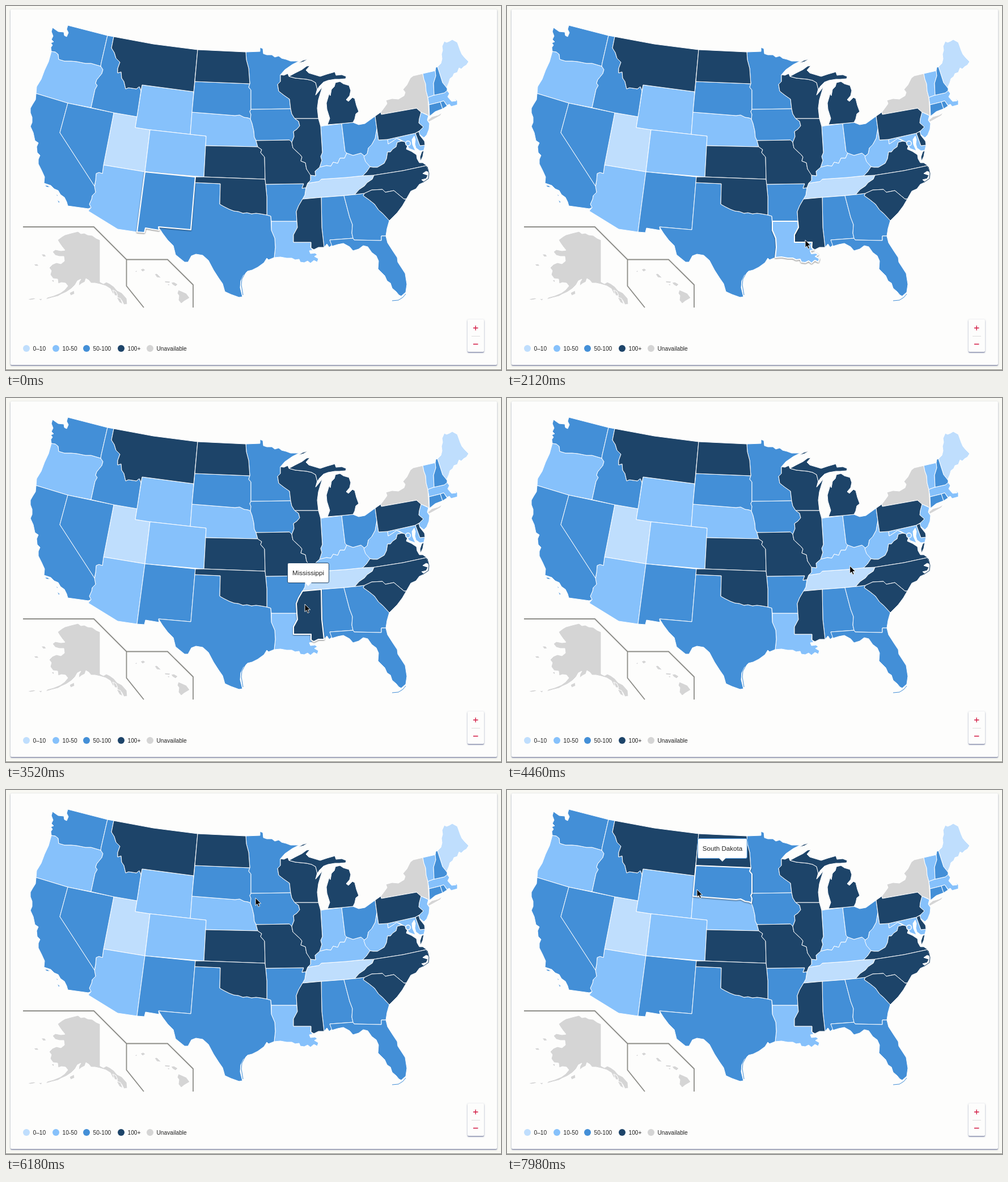
Recreate the animation shown at these times as an HTML page. Size 873 by 641 pixels, loop 8000 ms.

```html
<!DOCTYPE html>
<html lang="en">
<head>
<meta charset="utf-8">
<title>State map</title>
<style>
  html, body { margin: 0; width: 100%; height: 100%; overflow: hidden; background: #f8f8f3; }
  body { position: relative; font-family: "Liberation Sans", Arial, sans-serif; }
  svg { position: absolute; left: 0; top: 0; }
  #states path { stroke: #fff; stroke-width: 1; stroke-linejoin: round; }
  #hot { stroke: #fff; stroke-width: 2; stroke-linejoin: round; filter: drop-shadow(0 1px 1px rgba(0,0,0,.5)); }
  .card { position: absolute; background: #fdfdfc; border-radius: 2px; box-shadow: 0 1px 3px rgba(60,70,120,.45), 0 2px 1px rgba(60,70,120,.3); }
  #tip { position: absolute; box-sizing: border-box; height: 36px; padding: 0 8px; line-height: 34px;
    font-size: 11.6px; color: #222; white-space: nowrap; background: #fff; border: 1px solid;
    border-radius: 3px; transform: translate(-50%, -41px); }
  #tip::after { content: ""; position: absolute; left: 50%; top: 34px; margin-left: -6px;
    border: 6px solid transparent; border-top-color: #fff; border-bottom: 0; }
</style>
</head>
<body>
<div class="card" style="left:8px;top:6px;width:858px;height:626px"></div>
<div class="card" style="left:814px;top:552px;width:29px;height:57px"></div>

<svg width="873" height="641" viewBox="0 0 873 641">
  <path d="M0 640.5H873" stroke="#8a8a84"/>
  <g id="states">
    <g fill="#d5d5d5">
      <path id="NY" d="M661,187 667,179 672,172 670,166 681,163 692,164 702,158 704,152 700,147 707,139 713,127 718,123 735,119 737,129 740,137 741,150 744,161 745,175 746,194 742,191 732,187 724,180 662,191Z"/>
      <path d="M744,201 751,195 762,192 769,188 766,193 757,198 746,204Z"/>
      <path d="M127,397 132,401 138,400 144,403 152,404 159,409 166,412V486L172,489 177,486 183,489 190,494 196,501 204,505 213,515 214,525 208,526 204,518 198,515 195,509 188,506 184,498 176,493 166,490 157,488 150,488 146,483 141,480 139,486 133,489 128,493 129,486 132,481 126,484 122,491 115,498 106,504 97,508 92,511 80,514 70,517 73,513 84,510 96,505 103,500 109,493 105,488 98,487 92,489 91,481 83,480 78,473 80,466 76,461 82,455 89,452 97,454 103,449 102,441 94,441 87,439 82,433 87,429 97,431 104,430 99,424 94,417 91,412 99,406 104,403 115,400Z"/>
      <path d="M62,437 68,437 71,441 66,442ZM49,455 55,454 58,458 52,458ZM112,505 120,501 121,507 114,510ZM80,483 85,482 84,487ZM38,516 49,514 53,516 43,518ZM57,516 64,515 62,519Z"/>
      <path d="M188,500 194,503 197,510 192,510ZM195,513 202,515 206,525 200,522Z"/>
      <path d="M237,464 242,462 246,465 241,468ZM227,468 231,465 231,469ZM262,472 266,471 271,476 274,479 266,478ZM280,484 290,485 288,488 280,487ZM284,489 289,490 287,493ZM291,487 296,486 303,490 299,494 294,491ZM304,500 309,502 318,506 324,514 314,520 309,524 304,518 305,510 302,506Z"/>
    </g>
    <g fill="#bfdefd">
      <path id="UT" d="M190,188 231,195 228,214 254,218 245,292 172,280Z"/>
      <path id="ME" d="M761,107 767,101 769,93 768,85 770,78 769,71 773,62 777,64 782,62 787,59 796,64 801,78 804,85 809,91 816,98 812,104 807,107 803,111 799,109 796,117 790,119 788,124 783,128 781,135 777,144 770,135Z"/>
      <path id="TN" d="M532,312 552,309 556,305 600,302 629,299 649,298 646,305 637,311 632,317 623,323 615,332 596,334 556,337 523,340 527,333 529,320Z"/>
    </g>
    <g fill="#86c1fb">
      <path id="OR" d="M80,80 87,81 92,85 93,94 103,97 115,97 125,98 140,101 150,101 167,106 171,112 169,119 160,130 158,136 161,140 157,147 150,179 109,171 53,154 54,142 62,129 68,113 75,98Z"/>
      <path id="WY" d="M240,139 331,151 325,226 254,218 228,214Z"/>
      <path id="CO" d="M254,218 325,226 353,229 349,301 245,292Z"/>
      <path id="AZ" d="M172,280 245,292 231,398 197,393 145,361 150,355 147,349 151,340 152,334 158,328 156,319 158,307 159,295 164,293 170,295Z"/>
      <path id="NE" d="M328,187 404,193 412,192 420,196 427,197 431,199 434,207 437,220 438,231 441,237 444,248 352,246 353,229 325,226Z"/>
      <path id="LA" d="M468,379H513L514,390 507,403V416H538L537,425 541,430 535,431 537,436 545,435 549,438 544,441 551,445 549,451 543,448 537,453 532,449 526,452 519,451 517,446 510,447 504,444 495,444 484,442 473,443 475,425 474,409 468,395Z"/>
      <path id="IN" d="M555,212 560,211 592,207 598,256 601,259 597,268 589,268 585,277 577,275 573,282 565,281 553,284 557,272 555,265 558,258Z"/>
      <path id="KY" d="M532,312 537,307 537,298 546,299 545,291 553,284 565,281 573,282 577,275 585,277 589,268 597,268 601,259 612,263 626,259 632,264 634,272 642,283 636,292 629,299 600,302 556,305 552,309Z"/>
      <path id="WV" d="M654,216 657,236 673,235 674,243 682,238 689,233 698,238 690,240 688,248 682,252 678,257 673,257 671,269 667,277 655,284 647,284 642,283 634,274 631,265 637,260 639,250 645,244 651,233Z"/>
      <path id="MD" d="M673,235 722,224 730,246 739,245 737,254 730,255 723,250 721,243 722,235 720,229 716,235 717,244 722,255 711,251 707,245 702,239 695,235 689,233 682,238 674,243Z"/>
      <path id="NJ" d="M732,187 745,193 743,201 747,207 746,217 742,227 737,232 728,225 729,220 736,213 728,206 729,198Z"/>
      <path id="VT" d="M735,119 757,114 758,123 754,136 755,157 744,161 741,150 740,137 737,129Z"/>
      <path id="MA" d="M744,161 755,157 773,153 778,149 782,154 779,160 786,168 794,167 790,162 796,167 796,174 785,177 782,173 778,175 772,167 766,169 746,174Z"/>
    </g>
    <g fill="#438fd7">
      <path id="WA" d="M109,34 179,52 168,100 167,106 150,101 140,101 125,98 115,97 103,97 93,94 92,85 87,81 80,80 79,73 82,69 79,65 84,63 80,59 83,53 80,45 82,38 92,45 102,46 103,52 107,54 110,47 107,41Z"/>
      <path id="CA" d="M53,154 109,171 95,223 156,317 158,328 152,334 151,340 147,349 150,355 145,357 109,352 107,345 103,337 96,332 92,325 85,322 79,316 67,312 68,301 63,290 57,278 57,270 60,263 55,258 54,248 57,241 51,237 48,223 43,212 46,205 46,196 43,188 43,180 47,173 52,165Z"/>
      <path d="M68,316 73,316 78,319 72,319ZM88,331 92,334 90,335ZM90,341 95,345 93,347Z" stroke="none"/>
      <path id="NV" d="M109,171 190,188 172,280 170,295 164,293 159,295 158,307 156,317 95,223Z"/>
      <path id="ID" d="M179,52 190,54 186,74 191,82 194,92 201,99 197,110 197,118 203,116 204,127 208,133 211,146 216,144 230,146 235,142 238,149 231,195 190,188 150,179 157,147 161,140 158,136 160,130 169,119 171,112 167,106 168,100Z"/>
      <path id="NM" d="M245,292 334,301 333,311 326,394 269,389 270,395 246,391 244,399 231,398Z"/>
      <path id="SD" d="M333,133 430,137 428,143 432,148V182L430,186 432,191 431,199 427,197 420,196 412,192 404,193 328,187Z"/>
      <path id="TX" d="M333,311 378,313 377,349 384,353 394,358 402,361 410,362 418,365 425,364 433,366 441,365 449,366 460,368 467,370 468,395 474,409 475,425 473,443 463,447 460,444 455,452 444,460 434,465 426,467 419,474 414,484 413,496 417,512 411,513 397,508 386,503 382,489 375,479 366,465 357,448 347,439 335,437 327,440 321,451 315,451 299,438 295,422 285,412 276,400 269,389 326,394Z"/>
      <path id="MN" d="M423,81 448,80V73L453,75 454,84 460,86 469,86 474,90 481,88 486,92 494,94 502,97 517,97 505,103 492,112 484,121V133L479,138 481,150 490,157 500,164 502,181 432,182V148L428,143 430,137 428,110 424,95Z"/>
      <path id="IA" d="M432,182 502,181 504,190 509,198 516,203 518,211 513,217 507,221 508,230 504,240 500,236 441,237 438,231 437,220 434,207 431,199 432,191 430,186Z"/>
      <path id="AR" d="M458,314 525,313 522,321 529,320 527,333 523,340 516,352 512,362 513,379H468L467,370 460,368 460,336Z"/>
      <path id="AL" d="M556,337 596,334 606,372 611,385 610,400 612,409 571,412 575,421 570,425 566,419 561,425 557,390Z"/>
      <path id="GA" d="M596,334 615,332 632,330 630,334 640,341 650,349 657,359 665,366 676,378 672,392 670,405 662,405V413L614,412 612,409 610,400 611,385 606,372Z"/>
      <path id="FL" d="M571,412 612,409 614,412 662,413V405L670,405 673,417 682,431 690,443 691,451 704,471 707,490 705,504 697,511 693,509 688,503 681,497 678,488 672,484 668,475 662,469 656,463 657,449 653,440 645,434 638,424 630,422 622,428 612,431 606,424 595,418 585,420 575,423Z"/>
      <path id="OH" d="M592,207 612,205 622,209 633,207 651,194 654,216 651,233 645,244 639,250 637,260 632,264 626,259 612,263 601,259 598,256Z"/>
      <path id="NH" d="M757,114 758,108 761,107 770,135 778,145 778,149 773,153 755,157 754,136 758,123Z"/>
      <path id="CT" d="M746,174 766,169 770,181 757,186 747,194Z"/>
      <path id="RI" d="M766,169 772,167 778,176 770,181Z"/>
    </g>
    <g fill="#1d4469">
      <path id="MT" d="M190,54 260,67 338,77 331,151 240,139 238,149 235,142 230,146 216,144 211,146 208,133 204,127 203,116 197,118 197,110 201,99 194,92 191,82 186,74Z"/>
      <path id="ND" d="M338,77 423,81 424,95 428,110 430,137 333,133Z"/>
      <path id="KS" d="M352,246 444,248 451,253 449,258 456,266 457,305 349,301Z"/>
      <path id="OK" d="M334,301 349,301 457,305 458,314 460,336 460,368 449,366 441,365 433,366 425,364 418,365 410,362 402,361 394,358 384,353 377,349 378,313 333,311Z"/>
      <path id="MO" d="M441,237 500,236 504,240 506,250 519,262 522,266 520,273 528,276 530,287 537,297V307L532,312 529,320 522,321 525,313 458,314 457,305 456,266 449,258 451,253 444,248Z"/>
      <path id="IL" d="M509,198H551L555,212 558,258 555,265 557,272 553,284 545,291 546,299 537,298 530,287 528,276 520,273 522,266 519,262 506,250 504,240 508,230 507,221 513,217 518,211 516,203Z"/>
      <path id="WI" d="M484,121 490,122 497,119 499,124 510,127 530,129 539,131 546,135 549,146 546,157 552,150 558,142 554,155 551,165 549,180 551,198H509L504,190 502,181 500,164 490,157 481,150 479,138 484,133Z"/>
      <path id="MI" d="M567,209 571,198 566,182 565,171 568,161 570,154 572,158 574,147 579,142 581,135 589,133 595,137 605,140 608,149 606,158 600,165 604,168 611,161 615,163 618,175 622,186 617,190 615,199 612,205 592,207Z"/>
      <path d="M499,124 510,118 522,112 530,106 536,105 529,113 534,118 544,121 554,124 566,120 580,116 582,122 592,121 600,124 599,128 588,129 580,129 568,131 560,134 553,141 549,147 546,135 539,131 530,129 510,127ZM515,101 523,96 533,93 525,98Z"/>
      <path id="MS" d="M523,340 556,337 557,390 561,425 551,425 543,429 538,426V416H507V403L514,390 513,379 512,362 516,352Z"/>
      <path id="PA" d="M651,194 661,187 662,191 724,180 732,187 729,198 728,206 736,213 729,220 722,224 673,235 657,236 654,216Z"/>
      <path id="DE" d="M722,224 728,221 730,228 738,238 739,245 730,246Z"/>
      <path id="VA" d="M698,238 703,239 708,246 706,252 715,256 724,262 725,269 729,276 735,276 742,281 700,290 649,298 629,299 636,292 642,283 647,284 655,284 667,277 671,269 673,257 678,257 682,252 688,248 690,240ZM733,257 737,254 735,265 731,273 730,266Z"/>
      <path id="NC" d="M649,298 700,290 742,281 746,293 741,291 735,295 744,298 741,304 733,306 738,310 729,314 723,322 714,326 706,340 702,340 684,325 669,328 664,323 645,324 632,330 615,332 623,323 632,317 637,311 646,305Z"/>
      <path id="SC" d="M632,330 645,324 664,323 669,328 684,325 702,340 706,340 699,352 690,364 683,371 676,378 665,366 657,359 650,349 640,341 630,334Z"/>
    </g>
    <circle cx="709" cy="242" r="4.2" fill="#86c1fb" stroke="#fff" stroke-width="1.5"/>
  </g>
  <g fill="none" stroke="#438fd7">
    <path d="M422,470 416,481 415,491 418,509M681,519 692,518 700,513 705,507"/>
    <path d="M743,283 746,295 745,304 736,310" stroke="#1d4469"/>
  </g>
  <path id="hot"/>
  <path d="M30 389H155L212.500 446.500H285L330 491V531M212.500 446.500V493L243 531" fill="none" stroke="#8d8d88" stroke-width="1.800"/>
  <g id="legend" font-size="10.2" fill="#222"></g>
  <path d="M824 567H832.500M828.200 562.800V571.200M824 595.500H832.500" stroke="#d2143f" stroke-width="1.300"/>
  <path d="M821 581.500H836" stroke="#ddd"/>
</svg>

<div id="tip"></div>

<svg width="873" height="641" viewBox="0 0 873 641">
  <g id="pointer">
    <circle id="ring" cy="1" r="19" fill="#fff" fill-opacity=".7" stroke="#111" stroke-width="1.500"/>
    <path d="M0 0V13.500L3 10.700 5.200 15.600 7.500 14.600 5.300 9.900H9.600Z" fill="#000" stroke="#fff" stroke-width=".9"/>
  </g>
</svg>

<script>
const LOOP = 8000;
const $ = id => document.getElementById(id);

const legend = [[36, '#bfdefd', '0–10'], [88, '#86c1fb', '10-50'], [142, '#438fd7', '50-100'],
  [203, '#1d4469', '100+'], [254, '#d5d5d5', 'Unavailable']];
$('legend').innerHTML = legend.map(([x, color, label]) =>
  `<circle cx="${x}" cy="603" r="6" fill="${color}"/><text x="${x + 11.5}" y="606.5">${label}</text>`).join('');

// Pointer stops: time, x, y
const stops = [[1000, 569, 439], [1500, 569, 439], [2050, 526, 412], [2250, 526, 412], [2800, 527, 363],
  [4000, 527, 363], [4900, 677, 233], [5350, 677, 233], [6050, 440, 190], [6300, 440, 190],
  [6900, 335, 175], [LOOP, 335, 175]];

// Highlighted states; those with a label also get a tooltip
const hovers = [
  { id: 'NM', from: 0, to: 1600 },
  { id: 'LA', from: 1750, to: 2250 },
  { id: 'MS', from: 2250, to: 4150, label: 'Mississippi', x: 533, y: 331, show: 2500 },
  { id: 'WV', from: 4800, to: 5500, label: 'West Virginia', x: 664, y: 213, show: 4950 },
  { id: 'SD', from: 6550, to: LOOP, label: 'South Dakota', x: 380, y: 126, show: 6800 }
];

const clamp = v => Math.max(0, Math.min(1, v));
const ease = v => v * v * (3 - 2 * v);

function pointerAt(t) {
  const i = stops.findIndex(s => s[0] > t);
  if (i < 1) return stops[0].slice(1);
  const [t0, x0, y0] = stops[i - 1], [t1, x1, y1] = stops[i];
  const k = ease((t - t0) / (t1 - t0));
  return [x0 + (x1 - x0) * k, y0 + (y1 - y0) * k];
}

function draw(t) {
  const hover = hovers.find(h => t >= h.from && t < h.to);
  const hot = $('hot'), tip = $('tip');
  hot.style.display = hover ? '' : 'none';
  tip.style.opacity = 0;
  if (hover) {
    const state = $(hover.id), fill = state.parentNode.getAttribute('fill');
    hot.setAttribute('d', state.getAttribute('d'));
    hot.setAttribute('fill', fill);
    if (hover.label) {
      tip.textContent = hover.label;
      tip.style.left = hover.x + 'px';
      tip.style.top = hover.y + 'px';
      tip.style.borderColor = fill;
      tip.style.opacity = clamp((t - hover.show) / 180);
    }
  }
  const [x, y] = pointerAt(t);
  $('pointer').setAttribute('transform', `translate(${x} ${y})`);
  $('pointer').style.display = t < stops[0][0] ? 'none' : '';
  $('ring').style.display = t < stops[1][0] ? '' : 'none';
}

function frame() {
  draw(performance.now() % LOOP);
  requestAnimationFrame(frame);
}
frame();
</script>
</body>
</html>
```
